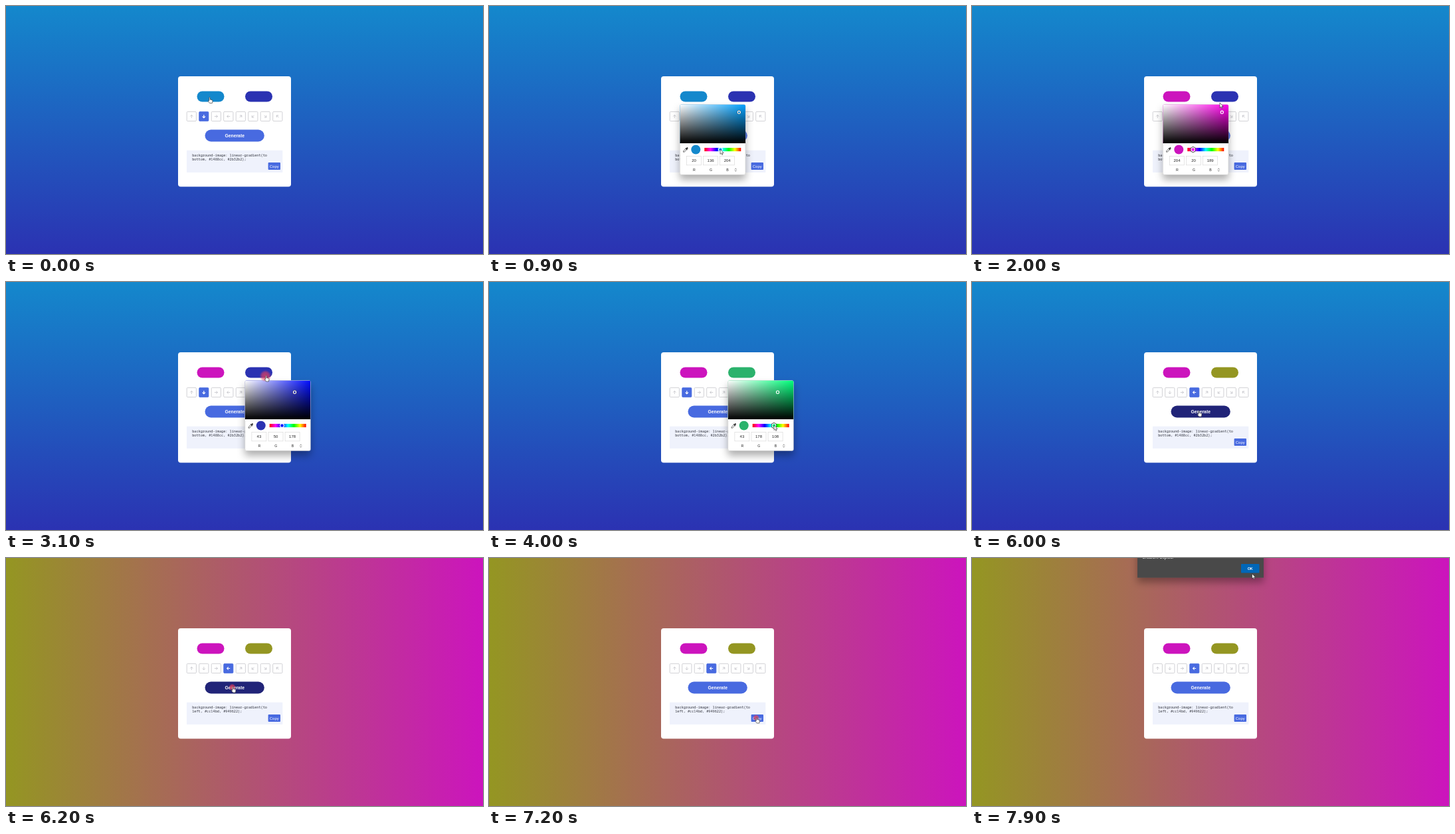
An HTML page that plays this animation: 718 by 374 pixels, repeating every 8 s.

```html
<!DOCTYPE html>
<html lang="en">
<head>
<meta charset="utf-8">
<title>Gradient generator</title>
<style>
html, body { margin: 0; width: 100%; height: 100%; overflow: hidden; }
svg { display: block; width: 100%; height: 100%; }
text { font-family: "Liberation Sans", Arial, sans-serif; }
.code { font: 5.22px "Noto Sans Mono", "DejaVu Sans Mono", monospace; fill: #34363f; white-space: pre; }
.mid { text-anchor: middle; }
</style>
</head>
<body>
<svg viewBox="0 0 718 374" preserveAspectRatio="none">
  <defs>
    <linearGradient id="down" x2="0" y2="1"><stop stop-color="#1488cc"/><stop offset="1" stop-color="#2b32b2"/></linearGradient>
    <linearGradient id="left" x1="1" x2="0"><stop stop-color="#cc14bd"/><stop offset="1" stop-color="#949622"/></linearGradient>
    <linearGradient id="white"><stop stop-color="#fff"/><stop offset="1" stop-color="#fff" stop-opacity="0"/></linearGradient>
    <linearGradient id="black" x2="0" y2="1"><stop stop-opacity="0"/><stop offset="1"/></linearGradient>
    <linearGradient id="hues"></linearGradient>
    <radialGradient id="glow">
      <stop stop-color="#f0405a" stop-opacity=".85"/><stop offset=".6" stop-color="#e8405c" stop-opacity=".65"/>
      <stop offset="1" stop-color="#e8405c" stop-opacity="0"/>
    </radialGradient>
    <filter id="shadow" x="-30%" y="-30%" width="160%" height="180%">
      <feDropShadow dx="0" dy="7" stdDeviation="6" flood-color="#000" flood-opacity=".32"/>
    </filter>
    <clipPath id="round"><rect width="98.7" height="106" rx="2.5"/></clipPath>
  </defs>

  <rect id="page" width="718" height="374"/>
  <rect x="259" y="106" width="170" height="166.5" rx="4" fill="#fff"/>
  <rect id="pill0" x="287.5" y="128.5" width="41" height="16" rx="8"/>
  <rect id="pill1" x="360" y="128.5" width="41" height="16" rx="8"/>
  <g id="arrows"></g>
  <rect id="generate" x="299.5" y="186.5" width="89.3" height="18" rx="9"/>
  <text class="mid" x="344.2" y="197.9" font-size="6.8" font-weight="700" fill="#fff">Generate</text>
  <rect x="272" y="217.7" width="144.3" height="33.4" fill="#eff2fc"/>
  <text class="code" x="280.2" y="227">background-image: linear-gradient(to</text>
  <text class="code" id="line2" x="280.2" y="233.3"></text>
  <rect x="394.6" y="236" width="18.4" height="11" rx="1" fill="#486ae0"/>
  <text class="mid" x="403.8" y="243.5" font-size="6" fill="#fff">Copy</text>

  <g id="picker">
    <rect width="98.7" height="106" rx="2.5" fill="#fff" stroke="#b8b8b8" stroke-width=".5" filter="url(#shadow)"/>
    <g clip-path="url(#round)">
      <rect id="pure" width="98.7" height="58.5"/>
      <rect width="98.7" height="58.5" fill="url(#white)"/>
      <rect width="98.7" height="58.5" fill="url(#black)"/>
    </g>
    <g transform="translate(8.7 68.3) rotate(45)">
      <path d="M-1-1V3.5L0 4.8 1 3.5V-1" fill="none" stroke="#333" stroke-width=".7"/>
      <path d="M-1.9-1.5H1.9M0-2V-4" stroke="#222" stroke-width="1.1"/>
      <circle cy="-3.3" r="1.2" fill="#222"/>
    </g>
    <circle id="swatch" cx="24" cy="68" r="7"/>
    <rect x="37" y="65.4" width="55" height="5.2" fill="url(#hues)"/>
    <g id="hueKnob"><circle r="4.2"/><circle r="2.9" stroke="#fff" stroke-width="1.1"/></g>
    <g id="svKnob"><circle r="2.9"/><circle r="2.1" stroke="#fff" stroke-width="1.1"/></g>
    <g id="fields"></g>
    <path d="M82.8 98 84 96.4 85.2 98M82.8 99.2 84 100.8 85.2 99.2" fill="none" stroke="#444" stroke-width=".6"/>
  </g>

  <g id="alert">
    <rect x="249" y="-30" width="190" height="59.7" fill="#4a4a4a" filter="url(#shadow)"/>
    <text x="256" y="1" font-size="6.3" fill="#fff">Gradient Copied!</text>
    <rect x="405" y="9" width="27.5" height="13.5" rx="1" fill="#0067b8"/>
    <text class="mid" x="418.7" y="17.7" font-size="5.4" font-weight="700" fill="#fff">OK</text>
  </g>

  <circle id="ripple" fill="url(#glow)"/>
  <g id="cursor" stroke="#222" stroke-width=".6" stroke-linejoin="round" fill="#fff">
    <path id="pointer" d="M0 0V7.4L1.7 5.9 2.8 8.4 4 7.9 2.9 5.5H5.2Z"/>
    <path id="hand" d="M-.7.6Q0-.5.7.6V3.5L3.6 4.2Q4.6 4.6 4.5 5.8L3.9 9H.1L-2.2 5.9Q-2.2 4.7-.7 5.5Z"/>
  </g>
</svg>
<script>
const $ = id => document.getElementById(id);
const LOOP = 8000, STEP = 100;
const BLUE = '#486ae0';

// Each stop: time, x, y of the cursor tip
const path = [
  [0, 306.5, 137.5], [350, 306.5, 137.5], [900, 348, 216], [1000, 348, 216],
  [1700, 332.6, 216], [1800, 332.6, 216], [2000, 373, 146], [2200, 375, 146],
  [2700, 391.5, 141], [3150, 391.5, 141], [3600, 415.5, 216], [3700, 415.5, 216],
  [4300, 442.5, 216], [4400, 442.5, 216], [4650, 431, 172], [5000, 431, 172],
  [5400, 333.5, 164], [5550, 333.5, 164], [5850, 341.5, 194], [6350, 341.5, 194],
  [6850, 403, 240], [7350, 403, 240], [7800, 421.5, 23.7], [LOOP, 421.5, 23.7]
];
const clicks = [150, 2950, 4680, 5450, 6140, 7150];
const pickers = [
  { x: 287.3, open: 300, close: 2900 },
  { x: 359.7, open: 3000, close: 5200 }
];
const angles = [0, 180, 90, 270, 45, 225, 135, 315];
const hot = [
  [287.5, 128.5, 41, 16], [360, 128.5, 41, 16], [299.5, 186.5, 89.3, 18], [394.6, 236, 18.4, 11],
  ...angles.map((_, i) => [272 + 18.5 * i, 159, 14.5, 15])
];

const clamp = v => Math.min(1, Math.max(0, v));
const ease = v => v * v * (3 - 2 * v);
const ramp = (t, from, to) => ease(clamp((t - from) / (to - from)));
const mix = (a, b, k) => a + (b - a) * k;
const inside = ([x, y, w, h], px, py) => px >= x && px <= x + w && py >= y && py <= y + h;
const show = (id, on) => $(id).setAttribute('display', on ? 'inline' : 'none');
const fill = (el, color) => el.setAttribute('fill', color);
const move = (el, x, y) => el.setAttribute('transform', `translate(${x} ${y})`);
const css = c => `rgb(${c})`;

function rgb({ h, s, v }) {
  return [5, 3, 1].map(n => {
    const k = (n + h / 60) % 6;
    return Math.round(255 * v * (1 - s * clamp(Math.min(k, 4 - k))));
  });
}

function cursorAt(t) {
  const i = path.findIndex((p, n) => n && t <= p[0]);
  const [t0, x0, y0] = path[i - 1], [t1, x1, y1] = path[i];
  const k = ramp(t, t0, t1);
  return [mix(x0, x1, k), mix(y0, y1, k)];
}

function colorsAt(t) {
  const picked = t >= 4700;
  return [
    { h: mix(202.17, 304.89, ramp(t, 1000, 1700)), s: 184 / 204, v: 0.8 },
    {
      h: mix(236.89, 61.03, ramp(t, 3700, 4300)),
      s: picked ? 116 / 150 : 135 / 178,
      v: (picked ? 150 : 178) / 255
    }
  ];
}

$('hues').innerHTML = ['#f00', '#f0f', '#00f', '#0ff', '#0f0', '#ff0', '#f00']
  .map((c, i) => `<stop offset="${i / 6}" stop-color="${c}"/>`).join('');

$('arrows').innerHTML = angles.map((a, i) => `
  <g transform="translate(${279.3 + 18.5 * i} 166.5)">
    <rect x="-7.1" y="-7.1" width="14.2" height="14.2" rx="1.3" stroke-width=".8"/>
    <path d="M0 2.4V-2.2M-2.1 0 0-2.2 2.1 0" transform="rotate(${a})" fill="none"/>
  </g>`).join('');

$('fields').innerHTML = ['R', 'G', 'B'].map((c, i) => {
  const x = 21.2 + 25.1 * i;
  return `<rect x="${x - 11}" y="77.8" width="22" height="13.6" fill="#fff" stroke="#d4d4d4" stroke-width=".6"/>
    <text class="mid value" x="${x}" y="86.7" font-size="6" fill="#222"></text>
    <text class="mid" x="${x + .4}" y="100.3" font-size="5.2" fill="#222">${c}</text>`;
}).join('');
const values = document.querySelectorAll('.value');

function drawPicker(picker, color, t) {
  show('picker', picker);
  if (!picker) return;
  const channels = rgb(color), pure = css(rgb({ h: color.h, s: 1, v: 1 }));
  const onHue = (t >= 1000 && t < 2900) || (t >= 3700 && t < 4700);
  move($('picker'), picker.x, 148.5);
  fill($('pure'), pure);
  fill($('swatch'), css(channels));
  values.forEach((el, i) => el.textContent = channels[i]);
  const knob = (el, x, y, focused, c) => {
    move(el, x, y);
    fill(el.children[0], focused ? '#111' : 'none');
    fill(el.children[1], c);
  };
  knob($('hueKnob'), 37 + 55 * (1 - color.h / 360), 68, onHue, pure);
  knob($('svKnob'), 98.7 * color.s, 58.5 * (1 - color.v), !onHue, css(channels));
}

function drawArrows(selected) {
  [...$('arrows').children].forEach((g, i) => {
    const on = i === selected, [box, arrow] = g.children;
    fill(box, on ? BLUE : '#fff');
    box.setAttribute('stroke', on ? BLUE : '#c6c6cb');
    arrow.setAttribute('stroke', on ? '#fff' : '#c2c2c8');
    arrow.setAttribute('stroke-width', on ? 1.1 : .8);
  });
}

function drawRipple(t) {
  const click = clicks.find(c => t >= c && t < c + 350);
  show('ripple', click !== undefined);
  if (click === undefined) return;
  const age = (t - click) / 350, [x, y] = cursorAt(click);
  const el = $('ripple');
  el.setAttribute('cx', x - 1);
  el.setAttribute('cy', y + .8);
  el.setAttribute('r', 2.5 + 6.5 * clamp(age * 2.5));
  el.setAttribute('opacity', clamp(1.6 - 1.6 * age));
}

function render(t) {
  const [x, y] = cursorAt(t), colors = colorsAt(t);
  const index = pickers.findIndex(p => t >= p.open && t < p.close);
  const picker = pickers[index];
  const generated = t >= 6200, alerting = t >= 7300;
  const covered = alerting || (picker && inside([picker.x, 148.5, 98.7, 106], x, y));
  const over = covered ? -1 : hot.findIndex(r => inside(r, x, y));

  fill($('page'), generated ? 'url(#left)' : 'url(#down)');
  $('line2').textContent = generated ? 'left, #cc14bd, #949622);' : 'bottom, #1488cc, #2b32b2);';
  colors.forEach((c, i) => fill($('pill' + i), css(rgb(c))));
  fill($('generate'), over === 2 ? '#212478' : BLUE);
  drawArrows(t >= 5500 ? 3 : 1);
  drawPicker(picker, colors[index], t);
  show('alert', alerting);
  drawRipple(t);
  move($('cursor'), x, y);
  show('hand', over >= 0);
  show('pointer', over < 0);
}

const start = performance.now();
function tick(now) {
  const t = Math.max(0, now - start) % LOOP;
  render(Math.floor(t / STEP) * STEP);
  requestAnimationFrame(tick);
}
render(0);
requestAnimationFrame(tick);
</script>
</body>
</html>
```
